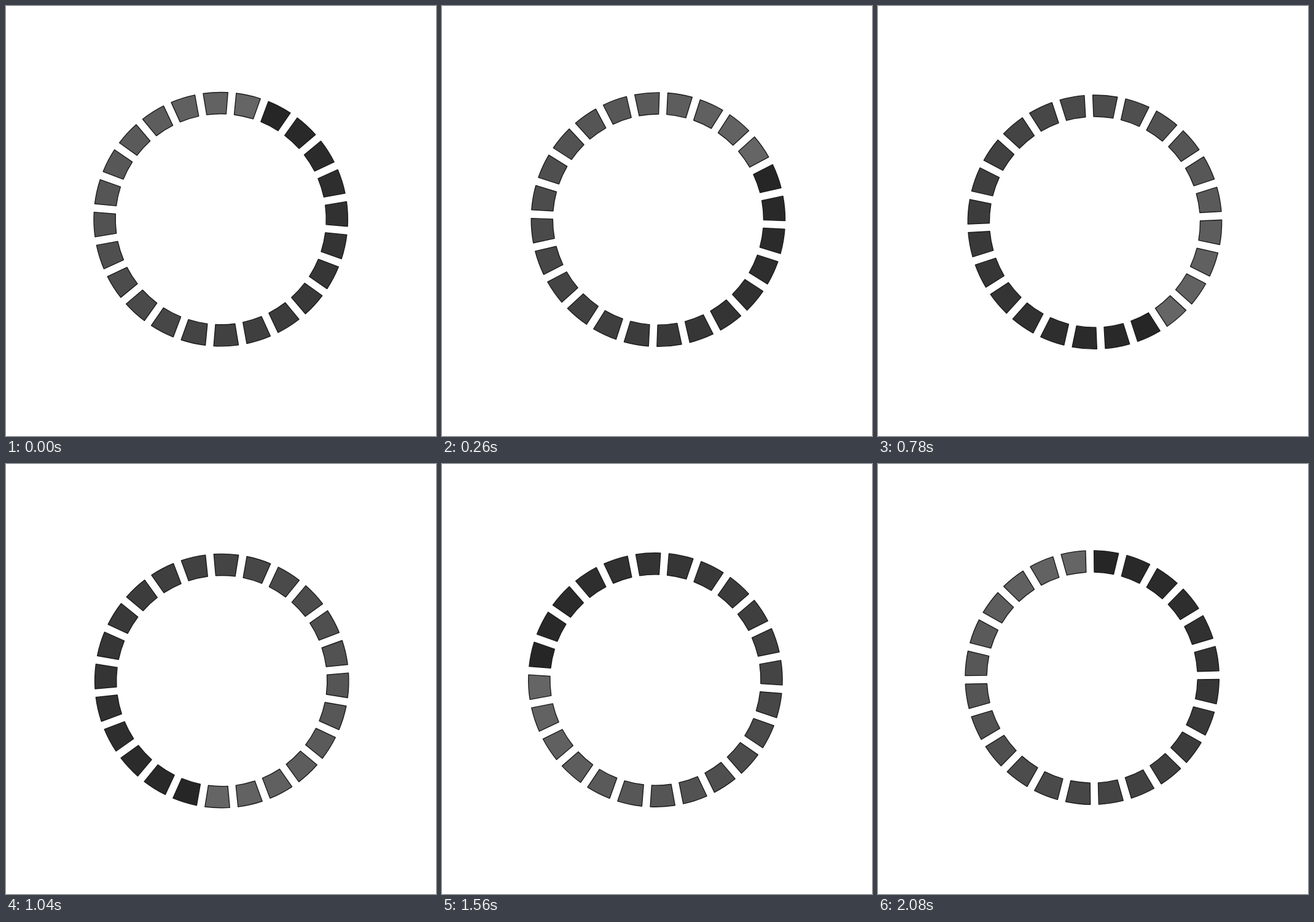
An HTML page with a canvas for the animation above (2.21 s loop, 700x700 px).

```html
<!DOCTYPE html>
<html lang="en">
<head>
<meta charset="utf-8">
<title>Ring spinner</title>
<style>
  html, body { margin: 0; width: 100%; height: 100%; overflow: hidden; background: #fff; }
  canvas { display: block; width: 700px; height: 700px; }
</style>
</head>
<body>
<canvas id="stage" width="700" height="700"></canvas>
<script>
const ctx = document.getElementById('stage').getContext('2d');

const PIVOT = 350.2;
const STEPS = 17, STEP_MS = 130;
const BLOCKS = 24;
const OUTER = 206.7, INNER = 171.6;
const HALF_OUTER = rad(5.6), HALF_INNER = rad(5.3);
const FIRST_ANGLE = rad(-62.4);              // centre of the darkest block
const RING_X = -0.5, RING_Y = -3.05;         // the ring sits slightly off the pivot
const DARK = 38, LIGHT = 101;

function rad(degrees) { return degrees * Math.PI / 180; }

function drawBlock(index) {
  const angle = FIRST_ANGLE + index / BLOCKS * 2 * Math.PI;
  const grey = Math.round(DARK + (LIGHT - DARK) * index / (BLOCKS - 1));
  ctx.beginPath();
  ctx.arc(0, 0, OUTER, angle - HALF_OUTER, angle + HALF_OUTER);
  ctx.arc(0, 0, INNER, angle + HALF_INNER, angle - HALF_INNER, true);
  ctx.closePath();
  ctx.fillStyle = `rgb(${grey}, ${grey}, ${grey})`;
  ctx.fill();
  ctx.stroke();
}

function draw(time) {
  const step = Math.floor(time / STEP_MS) % STEPS;
  ctx.setTransform(1, 0, 0, 1, 0, 0);
  ctx.fillStyle = '#fff';
  ctx.fillRect(0, 0, 700, 700);
  ctx.translate(PIVOT, PIVOT);
  ctx.rotate(step / STEPS * 2 * Math.PI);
  ctx.translate(RING_X, RING_Y);
  ctx.strokeStyle = '#1c1c1c';
  ctx.lineWidth = 1.4;
  ctx.lineJoin = 'round';
  for (let i = 0; i < BLOCKS; i++) drawBlock(i);
}

const start = performance.now();
function tick() {
  draw(performance.now() - start);
  requestAnimationFrame(tick);
}
tick();
</script>
</body>
</html>
```
